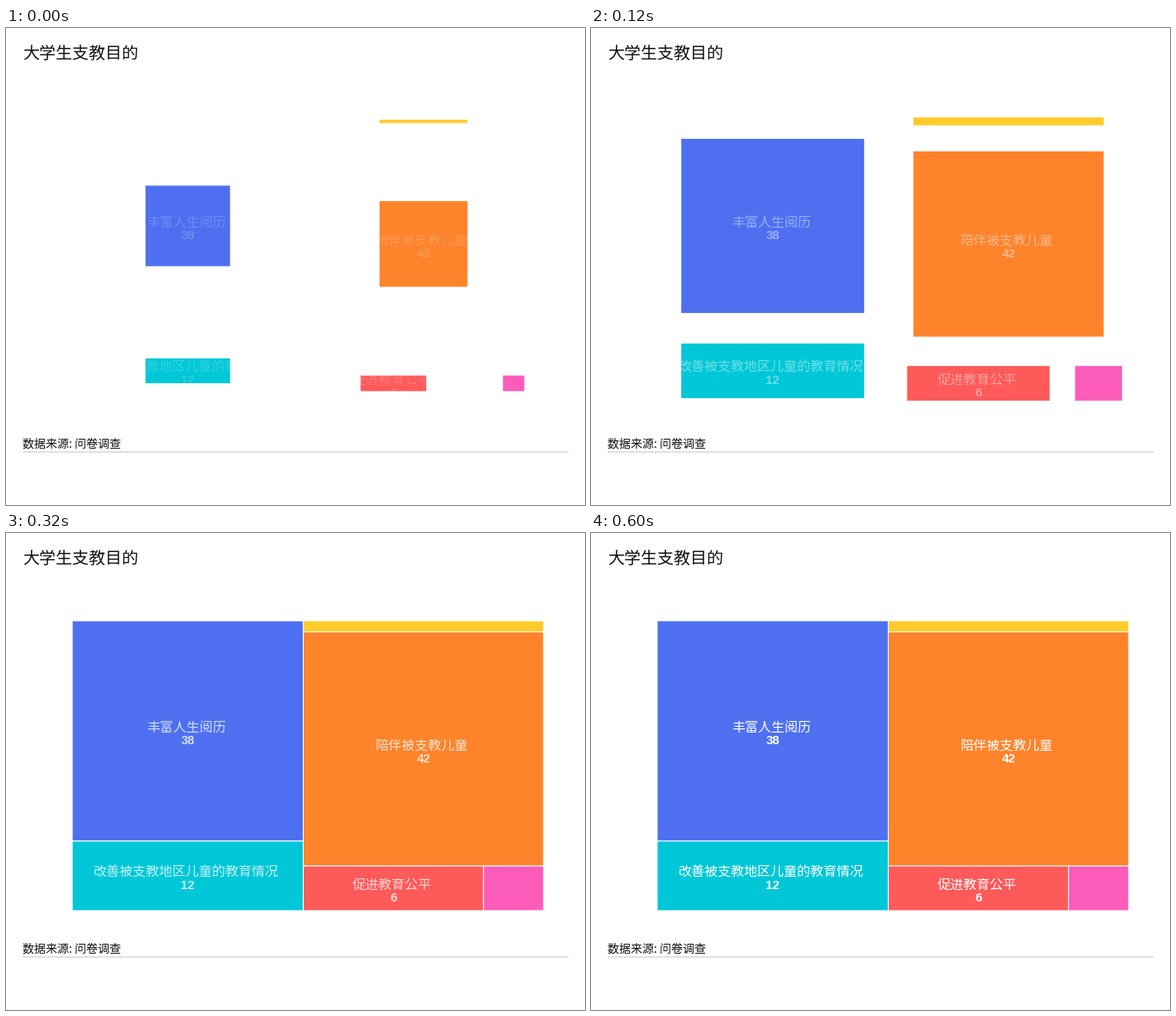
Animation of 700 by 576 pixels, one loop 2920 ms. Source, as a matplotlib script:

```python
import matplotlib.pyplot as plt
from matplotlib.animation import FuncAnimation
from matplotlib.patches import Rectangle
import numpy as np

W, H, DPI = 700, 576, 100
STEP, LOOP = 40, 2920
CJK = "Noto Sans CJK JP"

# Treemap area and the share of each answer
LEFT, TOP, WIDTH, HEIGHT = 80, 106, 570, 350
RICH, IMPROVE, COMPANY, FAIR, OTHER, LAST = 38, 12, 42, 6, 2, 2
TOTAL = RICH + IMPROVE + COMPANY + FAIR + OTHER + LAST

fig = plt.figure(figsize=(W / DPI, H / DPI), dpi=DPI, facecolor="white")
ax = fig.add_axes([0, 0, 1, 1])
ax.set_xlim(0, W)
ax.set_ylim(H, 0)
ax.axis("off")


def write(x, y, text, px, **style):
    style = {"family": CJK, "color": "#111111", "va": "baseline", **style}
    return ax.text(x, y, text, fontsize=px * 72 / DPI, **style)


class Tile:
    def __init__(self, x, y, w, h, color, label="", value=""):
        self.cx, self.cy, self.w, self.h = x + w / 2, y + h / 2, w, h
        self.rect = ax.add_patch(Rectangle(
            (x, y), w, h, fc=color, ec="white", lw=72 / DPI, snap=False))
        self.texts = []
        if label:
            # Labels end in a narrow space, so they sit 2 px to the left
            start = self.cx - 8 * len(label) - 2
            self.texts = [
                write(start, self.cy + 0.6, label, 16, color="white",
                      clip_on=True),
                write(self.cx, self.cy + 16.3, value, 15, color="white",
                      family="Liberation Sans", weight="bold", ha="center",
                      clip_on=True),
            ]

    def show(self, scale, alpha):
        w, h = self.w * scale, self.h * scale
        self.rect.set_bounds(self.cx - w / 2, self.cy - h / 2, w, h)
        for text in self.texts:
            text.set_alpha(alpha)
            text.set_clip_path(self.rect)


def build_tiles():
    left_w = WIDTH * (RICH + IMPROVE) / TOTAL
    right_w = WIDTH - left_w
    mid = LEFT + left_w
    rich_h = HEIGHT * RICH / (RICH + IMPROVE)
    unit = HEIGHT / (COMPANY + FAIR + OTHER + LAST)
    top_h, main_h, low_h = LAST * unit, COMPANY * unit, (FAIR + OTHER) * unit
    low_y = TOP + top_h + main_h
    fair_w = right_w * FAIR / (FAIR + OTHER)
    return [
        Tile(LEFT, TOP, left_w, rich_h, "#4e70f0", "丰富人生阅历", str(RICH)),
        Tile(LEFT, TOP + rich_h, left_w, HEIGHT - rich_h, "#00c7d7",
             "改善被支教地区儿童的教育情况", str(IMPROVE)),
        Tile(mid, TOP, right_w, top_h, "#ffcb2b"),
        Tile(mid, TOP + top_h, right_w, main_h, "#ff832b",
             "陪伴被支教儿童", str(COMPANY)),
        Tile(mid, low_y, fair_w, low_h, "#ff5a5a", "促进教育公平", str(FAIR)),
        Tile(mid + fair_w, low_y, right_w - fair_w, low_h, "#fb5cba"),
    ]


def cubic_in_out(t):
    return 4 * t**3 if t < 0.5 else 1 - 4 * (1 - t)**3


def update(i):
    ms = i * STEP
    # The zoom is already under way when the loop starts
    t = np.interp(ms, [0, 80, 160, 352], [0.452, 0.563, 0.694, 1])
    fade = 1 - (1 - min(1, (ms + 80) / 640))**1.5
    for tile in tiles:
        tile.show(cubic_in_out(t), fade)
    return []


write(20, 37.2, "大学生支教目的", 20)
write(20, 506.2, "数据来源: 问卷调查", 14)
ax.add_patch(Rectangle((20, 511), 660, 2, fc="#e0e0e0", ec="none"))
tiles = build_tiles()

anim = FuncAnimation(fig, update, frames=LOOP // STEP, interval=STEP,
                     init_func=lambda: update(0), repeat=True, repeat_delay=0)
plt.show()
```
